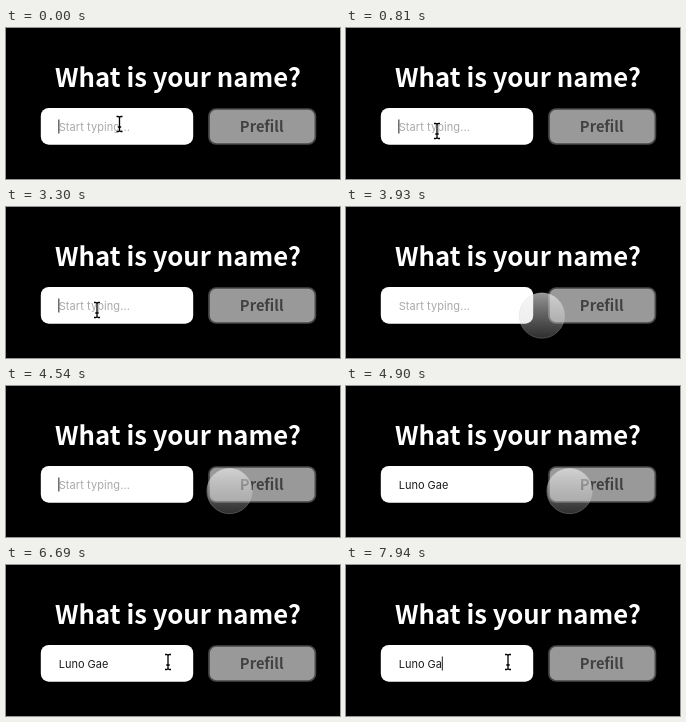
Recreate the animation shown at these times as an HTML page. Size 334 px wide and 151 px high, loop 8000 ms.

```html
<!DOCTYPE html>
<html lang="en">
<head>
<meta charset="utf-8">
<title>Name field</title>
<style>
  html, body { margin: 0; width: 100%; height: 100%; overflow: hidden; background: #000; }
  svg { display: block; width: 334px; height: 151px; }
  .label { font-family: "Noto Sans CJK JP", "Noto Sans CJK SC", "Noto Sans", sans-serif; font-weight: 600; text-anchor: middle; }
  .field { font: 11px Inter, "Liberation Sans", sans-serif; white-space: pre; }
  #hint { fill: #a9a9a9; letter-spacing: .08px; }
  #value { fill: #1c1c1c; }
</style>
</head>
<body>
<svg viewBox="0 0 334 151">
  <defs>
    <linearGradient id="glass" x1="0" y1="0" x2="0" y2="1">
      <stop offset="0" stop-color="#f4f4f4" stop-opacity=".62"/>
      <stop offset="1" stop-color="#c4c4c4" stop-opacity=".24"/>
    </linearGradient>
    <path id="beam" d="M-3 -7.5H-1.5Q0 -7.5 0 -6Q0 -7.5 1.5 -7.5H3M0 -6V6M-3 7.5H-1.5Q0 7.5 0 6Q0 7.5 1.5 7.5H3M-1.7 3H1.7" fill="none"/>
  </defs>
  <rect width="334" height="151"/>
  <text class="label" x="172" y="59" font-size="25.7" fill="#fff">What is your name?</text>
  <rect x="34.8" y="80" width="152.4" height="36.7" rx="8" fill="#fff"/>
  <rect x="203" y="81" width="106.4" height="35" rx="7" fill="#999" stroke="#484848" stroke-width="1.7"/>
  <text class="label" x="255.7" y="104" font-size="14.7" fill="#414141">Prefill</text>
  <text class="field" id="hint" x="52.7" y="103">Start typing...</text>
  <text class="field" id="value" x="52.7" y="103"></text>
  <rect id="caret" y="91.5" width="1.1" height="14" fill="#333"/>
  <g id="ibeam">
    <use href="#beam" stroke="#fff" stroke-width="2.6" stroke-opacity=".8"/>
    <use href="#beam" stroke="#000" stroke-width="1.3"/>
  </g>
  <circle id="touch" r="22.7" fill="url(#glass)" stroke="#ccc" stroke-opacity=".35" stroke-width=".8"/>
</svg>
<script>
  const LOOP = 8000, TICK = 88.9, BLINK = 455, LEFT = 52.7, FIELD_END = 188;
  const PREFILL = 4790, REFOCUS = 6210;
  const [hint, value, caret, ibeam, touch] =
    ["hint", "value", "caret", "ibeam", "touch"].map(id => document.getElementById(id));

  // Every entry restarts the caret blink.
  const typed = "James", preset = "Luno Gae";
  const edits = [{ t: -112, text: "" }];
  for (let i = 0; i < typed.length; i++)
    edits.push({ t: 1500 + 150 * i, text: typed.slice(0, i + 1) });
  for (let i = 0; i < typed.length; i++)
    edits.push({ t: 2570 + 175 * i, text: typed.slice(0, -1 - i) });
  edits.push(
    { t: PREFILL, text: preset },
    { t: REFOCUS, text: preset },
    { t: 7900, text: preset.slice(0, -1) }
  );

  const home = { x: 113.5, y: 96 };
  const glides = [
    { from: 0, to: 175, x: 91, y: 103 },
    { from: 3645, to: 4085, x: 223, y: 110 },
    { from: 4270, to: 4530, x: 223.5, y: 105 },
    { from: 5930, to: 6210, x: 162, y: 97 }
  ];

  const easeOut = u => 1 - (1 - u) ** 1.7;
  const show = (el, on) => el.setAttribute("visibility", on ? "visible" : "hidden");

  function pointerAt(t) {
    let { x, y } = home;
    for (const g of glides) {
      const u = Math.min(1, Math.max(0, (t - g.from) / (g.to - g.from)));
      x += (g.x - x) * easeOut(u);
      y += (g.y - y) * easeOut(u);
    }
    return { x, y };
  }

  function draw(t) {
    const { text, t: since } = edits.findLast(e => e.t <= t);
    const focused = t < PREFILL || t >= REFOCUS;
    if (value.textContent !== text) value.textContent = text;
    show(hint, !text);
    show(caret, focused && (t - since) % (2 * BLINK) < BLINK);
    caret.setAttribute("x", LEFT + (text ? value.getComputedTextLength() - .2 : -.4));

    const { x, y } = pointerAt(t);
    const inField = x < FIELD_END;
    show(ibeam, inField);
    show(touch, !inField);
    (inField ? ibeam : touch).setAttribute("transform", `translate(${x} ${y})`);
  }

  const start = performance.now();
  function run() {
    const t = (performance.now() - start) % LOOP;
    draw(Math.floor(t / TICK) * TICK);
    requestAnimationFrame(run);
  }
  run();
</script>
</body>
</html>
```
